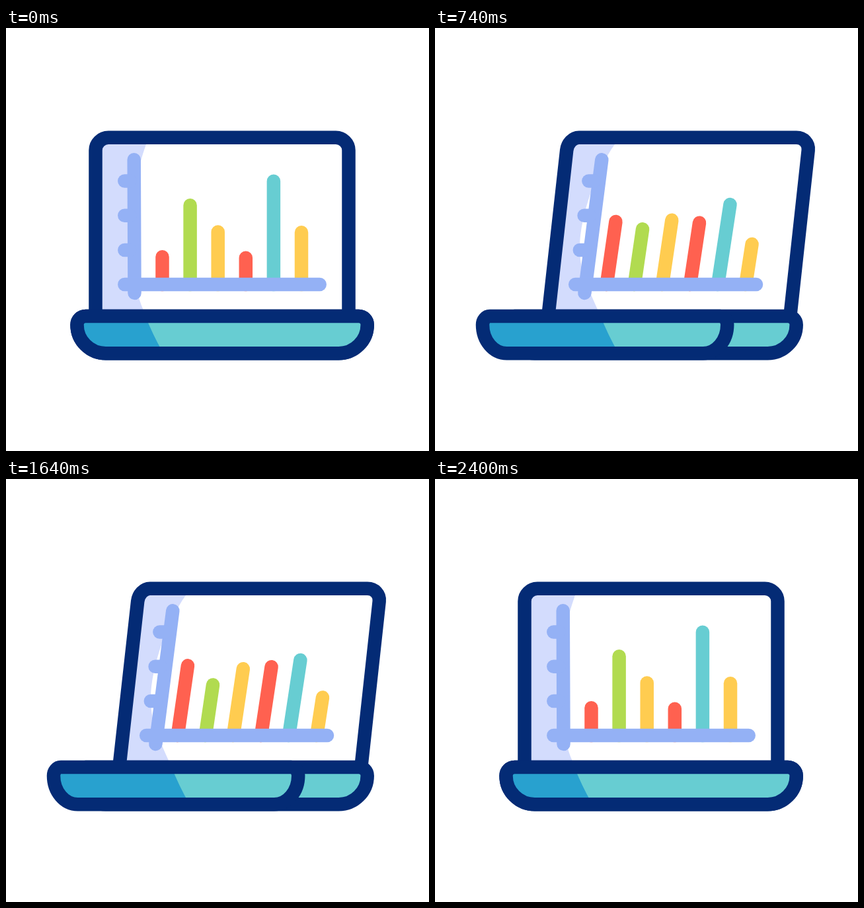
These frames come from a looping animation (640 px wide and 640 px high, 2420 ms). An HTML page with a canvas:

```html
<!DOCTYPE html>
<html lang="en">
<head>
<meta charset="utf-8">
<title>Laptop chart</title>
<style>
  html, body { margin: 0; width: 100%; height: 100%; overflow: hidden; background: #fff; }
  canvas { display: block; }
</style>
</head>
<body>
<canvas id="stage" width="640" height="640"></canvas>
<script>
const ctx = document.getElementById('stage').getContext('2d');
const LOOP = 2420;
const NAVY = '#042b75', TEAL = '#67cdd2', BLUE = '#28a1cf', AXIS = '#94b1f5', SHADE = '#d3dcfd';
const RED = '#ff6150', GREEN = '#b1db50', YELLOW = '#ffcc50';

// [colour, top at rest, top at the peak]
const bars = [
  [RED, 336, 218.8], [GREEN, 258, 337.2], [YELLOW, 298.3, 259.2],
  [RED, 337.5, 220.9], [TEAL, 221.5, 299], [YELLOW, 299, 338]
];

const mix = (a, b, k) => a + (b - a) * k;
const ease = (t, start, duration) => {
  const s = Math.min(1, Math.max(0, (t - start) / duration));
  return s * s * (3 - 2 * s);
};

function stroke(path, color, cap = 'round') {
  ctx.strokeStyle = color;
  ctx.lineCap = cap;
  ctx.stroke(path);
}

function fill(path, color) {
  ctx.fillStyle = color;
  ctx.fill(path);
}

const line = (x1, y1, x2, y2, color) => stroke(new Path2D(`M${x1},${y1} L${x2},${y2}`), color);

function drawLid(turn) {
  const m = (a, b) => mix(a, b, turn);
  const top = 165.8, side = 185, bottom = 436;
  const left = m(135.5, 171.3), right = m(518.5, 537.3);
  const leftTop = m(135.5, 201.3), rightTop = m(518.5, 566.8);
  const leftSide = m(135.5, 199.2), rightSide = m(518.5, 564.7);
  const rl = m(19.5, 16.5), rr = m(19.5, 20), k = 0.45;

  fill(new Path2D(`M${m(212, 272)},176
    C${m(200, 245)},${m(209, 213)} ${m(187.5, 219)},${m(262, 285)} ${m(187.5, 219)},${m(306, 332)}
    C${m(187.5, 219)},${m(350, 372)} ${m(194, 233)},${m(393, 395)} ${m(207.5, 246)},426
    l5,10 H${left} L${leftTop},${top} Z`), SHADE);

  stroke(new Path2D(`M${left},${bottom} L${leftSide},${side}
    C${mix(leftTop, leftSide, k)},${mix(top, side, k)} ${leftTop + rl * k},${top} ${leftTop + rl},${top}
    H${rightTop - rr}
    C${rightTop - rr * k},${top} ${mix(rightTop, rightSide, k)},${mix(top, side, k)} ${rightSide},${side}
    L${right},${bottom}`), NAVY, 'butt');
}

function drawChart(turn, swing) {
  const m = (a, b) => mix(a, b, turn);

  bars.forEach(([color, rest, peak], i) => {
    const y = mix(rest, peak, swing) + 10.25;
    const x = 236.5 + 42.1 * i + 24.7 * turn;
    const slope = (0.144 + 0.002 * i) * turn;
    line(x - 10 * slope, 388, x + (378 - y) * slope, y, color);
  });

  line(m(193.7, 252.3), 199.3, m(194.5, 226.4), 401, AXIS);
  for (let i = 0; i < 3; i++) {
    const x = m(179.3, 232.4 - 6.8 * i), y = 231.6 + 52.2 * i;
    line(x, y, x + 8, y, AXIS);
  }
  line(m(179.3, 212.2), 388, m(474.7, 486), 388, AXIS);
}

function basePath(left, right) {
  const sx = (right - left) / 439.2;
  const corner = 13 * sx, round = 43.4 * sx;
  return new Path2D(`M${left + corner},436 H${right - corner}
    A${corner},13 0 0 1 ${right},449
    A${round},43.3 0 0 1 ${right - round},492.3
    H${left + round}
    A${round},43.3 0 0 1 ${left},449
    A${corner},13 0 0 1 ${left + corner},436 Z`);
}

function drawBase(turn) {
  const back = basePath(107.5, 546.7);
  fill(back, TEAL);
  stroke(back, NAVY);

  const front = basePath(mix(107.5, 72, turn), mix(546.7, 442.2, turn));
  const edge = 39.6 * turn;
  fill(front, TEAL);
  ctx.save();
  ctx.clip(front);
  fill(new Path2D(`M0,436 H${211 + edge} Q${221 + edge},462 ${238 + edge},492.3 H0 Z`), BLUE);
  ctx.restore();
  stroke(front, NAVY);
}

function draw(now) {
  const t = now % LOOP;
  const turn = ease(t, 0, 450) - ease(t, 1950, 450);
  const swing = ease(t, 600, 300) - ease(t, 900, 300) + ease(t, 1200, 300) - ease(t, 1500, 300);

  ctx.fillStyle = '#fff';
  ctx.fillRect(0, 0, 640, 640);
  ctx.lineWidth = 20.5;
  drawLid(turn);
  drawChart(turn, swing);
  drawBase(turn);
}

const start = performance.now();
function tick() {
  draw(performance.now() - start);
  requestAnimationFrame(tick);
}
tick();
</script>
</body>
</html>
```
